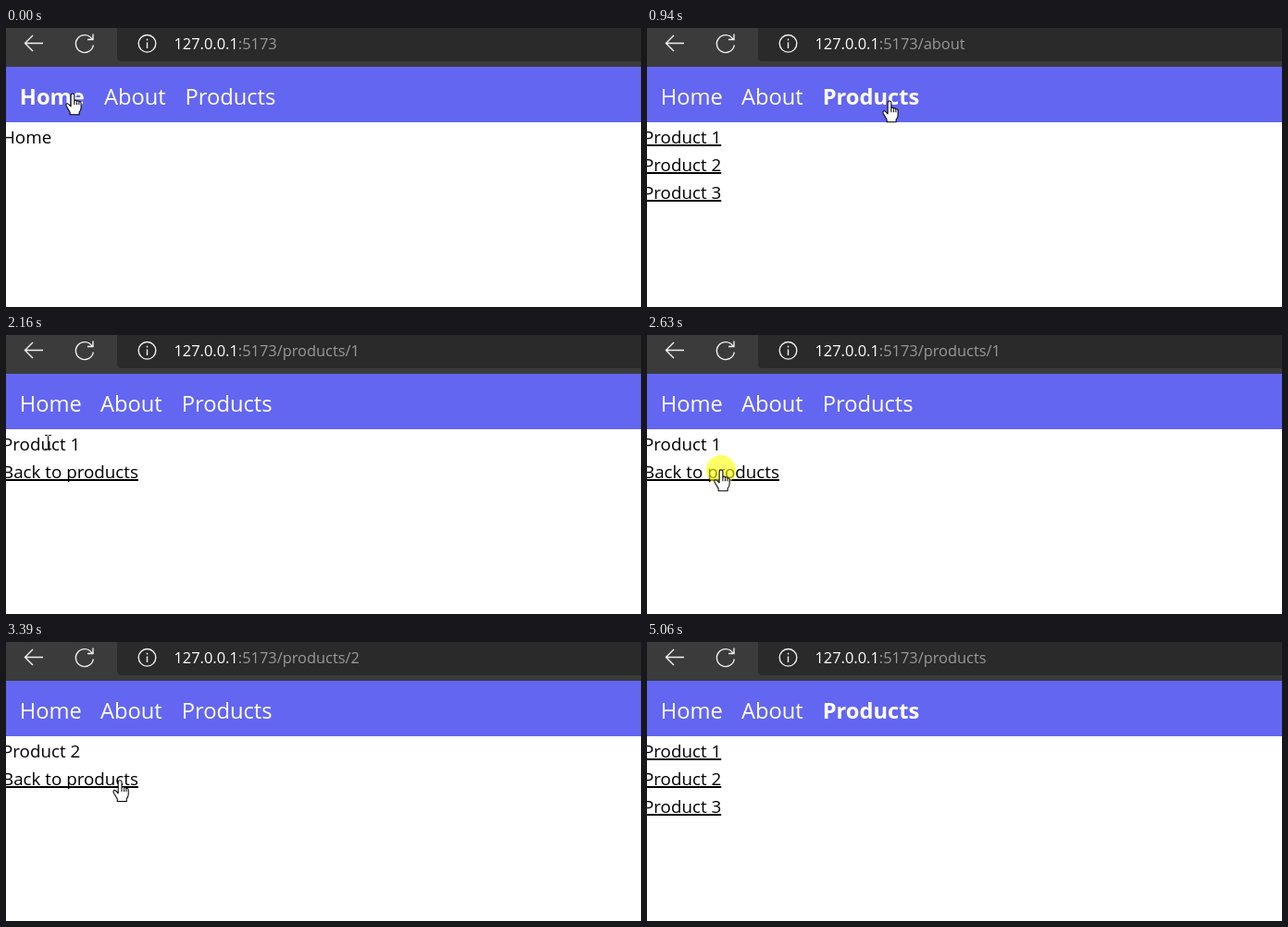
Recreate the animation shown at these times as an HTML page. Size 686 by 302 pixels, loop 5.13 s.

```html
<!DOCTYPE html>
<html lang="en">
<head>
<meta charset="utf-8">
<title>Router demo</title>
<style>
  html, body { margin: 0; width: 100%; height: 100%; overflow: hidden; background: #fff; }
  svg { display: block; width: 686px; height: 302px; cursor: default; }
  text { font-family: "Open Sans", "Noto Sans", sans-serif; white-space: pre; }
  #nav { font-size: 23.7px; font-weight: 450; fill: #fff; }
  #nav .active { font-weight: 700; }
  #page { font-size: 18.8px; fill: #000; }
  #url { font-size: 16.4px; fill: #999; }
  .icon { fill: none; stroke: #f2f2f2; stroke-width: 1.4; }
  #cursor path { fill: #fff; stroke: #000; stroke-width: 1.1; stroke-linejoin: round; }
  #cursor #beam { fill: none; stroke-width: 1; }
</style>
</head>
<body>
<svg viewBox="0 0 686 302">
  <rect width="686" height="42" fill="#3b3b3b"/>
  <path d="M120 0H686V36H125Q120 36 120 31Z" fill="#2a2a2a"/>
  <g class="icon">
    <path d="M40 16.5H20.5M29 8L20.5 16.5L29 25"/>
    <path d="M94.3 18.5A9.5 9.5 0 1 1 92.8 11.8M94 6.5V12.5H88"/>
    <circle cx="152.5" cy="16.8" r="9.3"/>
    <path d="M152.5 15.5V22M152.5 11.7V13.6"/>
  </g>
  <text id="url" x="181.5" y="23"><tspan fill="#fff">127.0.0.1</tspan><tspan>:5173</tspan><tspan id="path"></tspan></text>
  <rect y="42" width="686" height="60" fill="#6366f1"/>
  <g id="nav">
    <text x="14.8" y="83">Home</text>
    <text y="83">About</text>
    <text y="83">Products</text>
  </g>
  <g id="page">
    <text x="-4" y="125"></text><rect y="126" height="2"/>
    <text x="-4" y="155"></text><rect y="156" height="2"/>
    <text x="-4" y="185"></text><rect y="186" height="2"/>
  </g>
  <g id="cursor">
    <circle id="press" r="16" fill="#ff0" fill-opacity=".6"/>
    <path id="arrow" d="M0 0V18.5L4.2 14.5L7.2 21.5L10.2 20.2L7.2 13.4H13Z"/>
    <path id="hand" transform="scale(.95)" d="M-2 15V2Q-2 0 0 0T2 2V9Q2 7.5 3.4 7.5T4.7 9.2Q4.8 8.2 6 8.2T7.2 10Q7.3 9.2 8.4 9.2T9.6 11V16Q9.6 19 7.5 21V24H-3V21.5Q-4 19.5 -7 14.5Q-8.2 12 -6.5 11.3Q-5 11 -2 15M2 9V13M4.7 10V13M7.2 10.5V13"/>
    <path id="beam" d="M-3 -5.5H-.5L.5 -4.5L1.5 -5.5H4M.5 -4.5V8.5M-3 9.5H-.5L.5 8.5L1.5 9.5H4"/>
  </g>
</svg>
<script>
const LOOP = 5130, TICK = 67.5;

const visits = [[0, ''], [5, '/about'], [14, '/products'], [30, '/products/1'],
                [41, '/products'], [49, '/products/2'], [64, '/products']];
const presses = [[3, 4], [12, 13], [28, 29], [39, 40], [48, 48], [62, 63]];
const track = [[0, 72, 71], [3, 135, 71], [6, 135, 71], [11, 262, 79], [18, 262, 79],
               [24, 45, 114], [32, 45, 114], [35, 80, 146], [40, 80, 146], [43, 60, 143],
               [45, 52, 143], [48, 52, 143], [51, 148, 152], [53, 148, 152], [56, 115, 149],
               [71, 115, 149], [74, 441, 281], [75, 560, 340]];

const $ = id => document.getElementById(id);
const navItems = [...$('nav').children];
const lines = [...$('page').querySelectorAll('text')];
const rules = [...$('page').querySelectorAll('rect')];

const routeAt = tick => visits.findLast(([start]) => start <= tick)[1];

// Each line is [text, isLink].
function content(route) {
  if (route === '') return [['Home']];
  if (route === '/about') return [['About']];
  if (route === '/products') return [1, 2, 3].map(n => ['Product ' + n, true]);
  return [['Product ' + route.slice(-1)], ['Back to products', true]];
}

function pointerAt(tick) {
  const i = track.findLastIndex(([start]) => start <= tick);
  const a = track[i], b = track[i + 1] || a;
  const p = (tick - a[0]) / (b[0] - a[0] || 1);
  const eased = p * p * (3 - 2 * p);
  return [a[1] + (b[1] - a[1]) * eased, a[2] + (b[2] - a[2]) * eased];
}

function showPage(route) {
  const active = ['', '/about', '/products'].indexOf(route);
  navItems.forEach((item, i) => item.classList.toggle('active', i === active));
  navItems[1].setAttribute('x', active === 0 ? 106 : 102);
  navItems[2].setAttribute('x', [193.5, 195][active] || 189.7);

  const rows = content(route);
  lines.forEach((line, i) => {
    const [text, link] = rows[i] || [''];
    line.textContent = text;
    rules[i].setAttribute('width', link ? Math.max(0, line.getComputedTextLength() - 4) : 0);
  });
  return rows;
}

function shapeAt(x, y, rows) {
  const over = (el, left) => x >= left && x <= left + el.getComputedTextLength();
  if (y < 92) return navItems.some(el => over(el, +el.getAttribute('x'))) ? 'hand' : 'arrow';
  const i = Math.floor((y - 103) / 30);
  if (!rows[i] || !over(lines[i], -4)) return 'arrow';
  return rows[i][1] ? 'hand' : 'beam';
}

function draw(tick) {
  const rows = showPage(routeAt(tick));
  $('path').textContent = routeAt(Math.max(0, tick - 1));   // the address bar lags one tick
  const [x, y] = pointerAt(tick);
  const shape = shapeAt(x, y, rows);
  $('cursor').setAttribute('transform', `translate(${x} ${y})`);
  for (const id of ['arrow', 'hand', 'beam']) $(id).style.display = id === shape ? '' : 'none';
  const pressed = presses.some(([from, to]) => tick >= from && tick <= to);
  $('press').style.display = pressed ? '' : 'none';
}

const begin = performance.now();
function frame() {
  const time = (performance.now() - begin) % LOOP;
  draw(Math.min(75, Math.floor((time + 16) / TICK)));
  requestAnimationFrame(frame);
}
frame();
</script>
</body>
</html>
```
